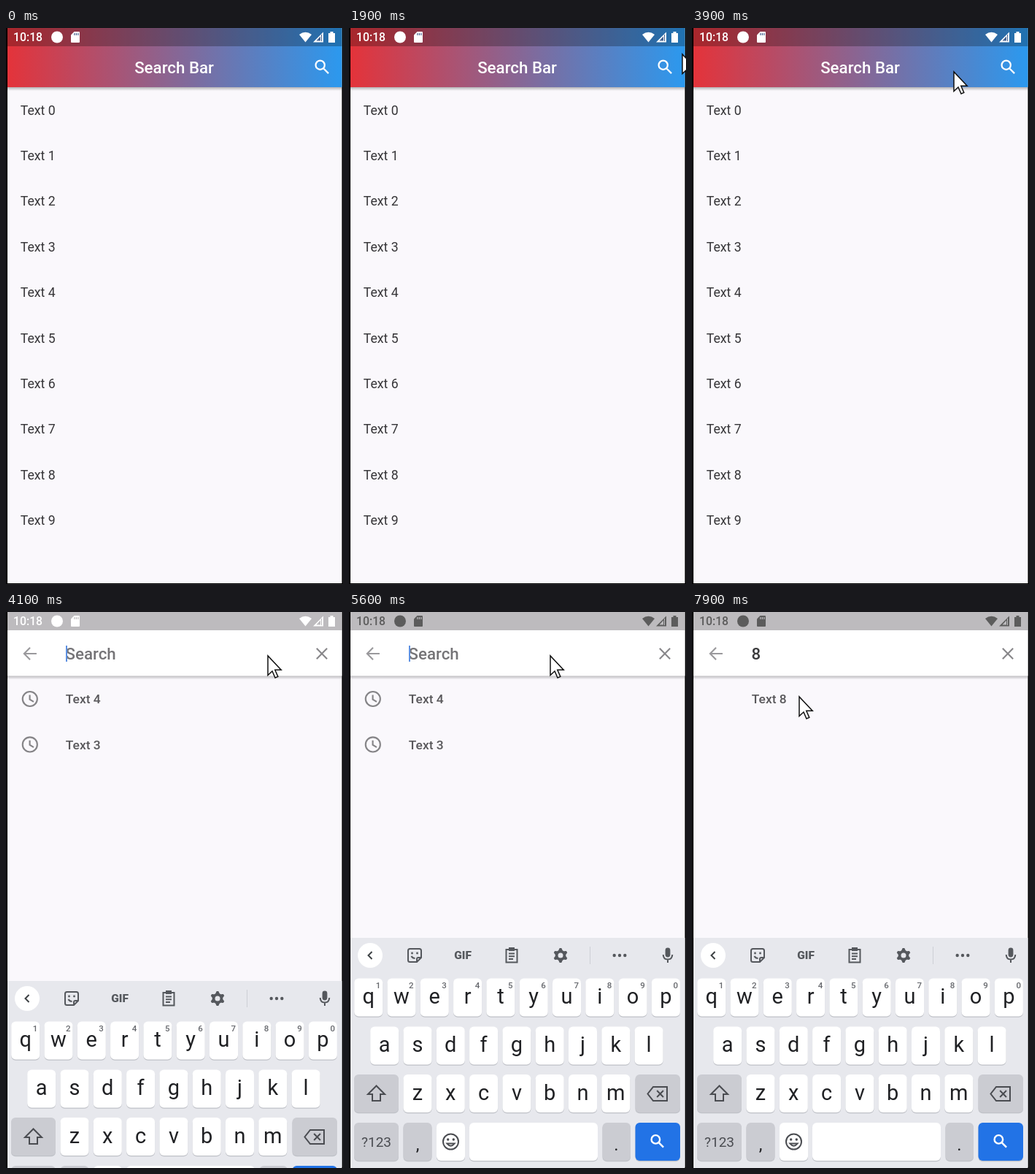
Animation, 462 px wide and 761 px high, one loop 8000 ms. Source, as an HTML page with a canvas:

```html
<!DOCTYPE html>
<html lang="en">
<head>
<meta charset="utf-8">
<title>Search Bar</title>
<style>
html, body { margin: 0; width: 100%; height: 100%; overflow: hidden; background: #000; }
canvas { display: block; width: 462px; height: 761px; }
</style>
</head>
<body>
<canvas id="stage"></canvas>
<script>
const W = 462, H = 761, LOOP = 8000, STEP = 100, DP = 1.117;
const LEFT = 2, RIGHT = 460.5, PAGE = '#faf8fc';
const canvas = document.getElementById('stage');
const ctx = canvas.getContext('2d');
const ratio = window.devicePixelRatio || 1;
canvas.width = W * ratio;
canvas.height = H * ratio;

// Icon outlines around (0, 0)
const ICON = {
  search: 'M3 -2.5A5.5 5.5 0 1 1 -8 -2.5A5.5 5.5 0 1 1 3 -2.5M1.5 1.5L7.7 7.7',
  back: 'M8 0H-7M0 -7.3L-7.3 0L0 7.3',
  close: 'M-6.4 -6.4L6.4 6.4M6.4 -6.4L-6.4 6.4',
  clock: 'M9 0A9 9 0 1 1 -9 0A9 9 0 1 1 9 0M-.2 -5V.5L4.6 3.4',
  chevron: 'M2.5 -5L-2.5 0L2.5 5',
  sticker: 'M-6.5 -9H6.5Q9 -9 9 -6.5V3L3 9H-6.5Q-9 9 -9 6.5V-6.5Q-9 -9 -6.5 -9ZM3 9V5Q3 3 5 3H9M-4.5 1Q-3 4 .5 4',
  clipboard: 'M-7.5 -8H7.5V9.5H-7.5ZM-4 -2.5H4M-4 1.2H4M-4 5H2',
  micStand: 'M-6.3 -1Q-6 5.5 0 5.5Q6 5.5 6.3 -1M0 5.5V10',
  shift: 'M0 -10.5L-11.5 1H-5.5V10H5.5V1H11.5Z',
  erase: 'M-6 -9.5H13V9.5H-6L-13.5 0ZM-.8 -4.5L8 4.5M8 -4.5L-.8 4.5',
  smile: 'M10.5 0A10.5 10.5 0 1 1 -10.5 0A10.5 10.5 0 1 1 10.5 0M-5.2 2.5Q0 9 5.2 2.5Z',
  arrow: 'M0 0V26.5L6 21L10 30L13.8 28.4L9.8 19.2H18.2Z'
};

// Pointer stops: time, x, y
const PATH = [
  [100, 470, 60], [900, 332, 223], [1200, 332, 223], [1300, 293, 104],
  [1400, 293, 104], [1900, 457, 36], [2100, 462, 30], [2600, 440, 30],
  [3000, 430, 44], [3500, 430, 46], [3900, 359, 60], [4100, 359, 60],
  [4700, 276, 60], [7000, 276, 60], [7500, 190, 166], [7900, 147, 116]
];

const clamp = v => Math.max(0, Math.min(1, v));

function rect(x, y, w, h, color) {
  ctx.fillStyle = color;
  ctx.fillRect(x, y, w, h);
}

function rounded(x, y, w, h, r, color) {
  ctx.fillStyle = color;
  ctx.beginPath();
  ctx.roundRect(x, y, w, h, r);
  ctx.fill();
}

function disc(x, y, r, color) {
  ctx.fillStyle = color;
  ctx.beginPath();
  ctx.arc(x, y, r, 0, Math.PI * 2);
  ctx.fill();
}

function text(str, x, y, size, color, weight = 400, align = 'left') {
  ctx.font = `${weight} ${size}px Roboto, sans-serif`;
  ctx.textAlign = align;
  ctx.fillStyle = color;
  ctx.fillText(str, x, y);
}

function shape(d, x, y, color) {
  ctx.save();
  ctx.translate(x, y);
  ctx.fillStyle = color;
  ctx.fill(new Path2D(d));
  ctx.restore();
}

function icon(name, x, y, color, line = 2, scale = 1) {
  ctx.save();
  ctx.translate(x, y);
  ctx.scale(scale, scale);
  ctx.strokeStyle = color;
  ctx.lineWidth = line;
  ctx.stroke(new Path2D(ICON[name]));
  ctx.restore();
}

function shadow(y, h, alpha) {
  const g = ctx.createLinearGradient(0, y, 0, y + h);
  g.addColorStop(0, `rgba(0,0,0,${alpha})`);
  g.addColorStop(1, 'rgba(0,0,0,0)');
  rect(LEFT, y, RIGHT - LEFT, h, g);
}

function statusBar(color, back) {
  text('10:18', 10, 18, 15.8, color, 500);
  disc(70, 12.5, 8, color);
  shape('M93.5 5H100Q101 5 101 6V19Q101 20 100 20H90Q89 20 89 19V9.5Z', 0, 0, color);
  for (let i = 0; i < 3; i++) rect(93.3 + i * 2.5, 7, 1.2, 3, back);
  shape('M410.5 19.5L402 9Q410.5 2.5 419 9Z', 0, 0, color);
  shape('M435 5.5V19.5H421Z', 0, 0, color);
  shape('M431 11.5V17.5H425.5Z', 0, 0, back);
  rect(432, 9, 1, 9, back);
  shape('M442 7H444.5V5H448.5V7H451V20H442Z', 0, 0, color);
}

function listPage() {
  rect(LEFT, 0, RIGHT - LEFT, H - 1, PAGE);
  const g = ctx.createLinearGradient(LEFT, 0, RIGHT, 0);
  g.addColorStop(0, '#e4333a');
  g.addColorStop(1, '#2b99ef');
  rect(LEFT, 0, RIGHT - LEFT, 81, g);
  rect(LEFT, 0, RIGHT - LEFT, 25, 'rgba(0,0,0,.26)');
  shadow(81, 5, .28);
  statusBar('#fff', '#44618f');
  text('Search Bar', 230.5, 62, 22.3, '#fff', 500, 'center');
  icon('search', 433.5, 53.5, '#fff', 2, DP);
  for (let i = 0; i < 10; i++) text('Text ' + i, 19.7, 118.6 + i * 62.4, 17.7, '#363538');
}

function gear(x, y, color) {
  ctx.fillStyle = color;
  ctx.beginPath();
  const teeth = 6;
  for (let i = 0; i < teeth * 4; i++) {
    const a = (i - .5) / (teeth * 4) * Math.PI * 2 + Math.PI / 6;
    const r = i % 4 < 2 ? 10 : 7.3;
    ctx.lineTo(x + r * Math.cos(a), y + r * Math.sin(a));
  }
  ctx.closePath();
  ctx.moveTo(x + 3.5, y);
  ctx.arc(x, y, 3.5, 0, Math.PI * 2);
  ctx.fill('evenodd');
}

function key(x, y, w, color = '#fff') {
  rounded(x, y + 1.3, w, 52, 6, '#bfc1c7');
  rounded(x, y, w, 52, 6, color);
}

function letters(str, first, y) {
  [...str].forEach((ch, i) => {
    const x = first + i * 45.3;
    key(x - 19.5, y, 39);
    text(ch, x, y + 34.5, 29, '#202124', 400, 'center');
  });
}

function toolbar() {
  const ink = '#55585d', y = 24;
  disc(29, y, 17, '#fff');
  icon('chevron', 29, y, '#3c4043');
  icon('sticker', 90, y, ink);
  disc(86.5, y - 3, 1.4, ink);
  disc(93.5, y - 3, 1.4, ink);
  text('GIF', 156, y + 5.3, 15.5, ink, 900, 'center');
  icon('clipboard', 223, y, ink);
  rect(219, y - 11, 8, 5, ink);
  gear(290, y, ink);
  rect(330, y - 12, 1, 24, '#cdcfd5');
  for (let i = -1; i < 2; i++) disc(371 + i * 7.3, y, 2.2, ink);
  rounded(433.6, y - 10.5, 6.8, 13, 3.4, ink);
  icon('micStand', 437, y, ink);
}

function keyboard(top) {
  const grey = '#cbccd2', ink = '#4a4c51';
  ctx.save();
  ctx.translate(0, top);
  rect(LEFT, 0, RIGHT - LEFT, 330, '#e7e8ed');
  toolbar();
  letters('qwertyuiop', 26.7, 55.5);
  for (let i = 0; i < 10; i++) {
    text((i + 1) % 10, 40 + i * 45.3, 69, 11.5, '#66686d', 500, 'center');
  }
  letters('asdfghjkl', 48.7, 121.5);
  letters('zxcvbnm', 94, 187);
  key(7, 187, 61, grey);
  icon('shift', 37.5, 213, ink);
  key(392.5, 187, 61.5, grey);
  icon('erase', 423, 213.5, ink);

  const y = 253;
  key(7, y, 61, grey);
  text('?123', 37.5, y + 32.5, 19, ink, 400, 'center');
  key(74.5, y, 39, grey);
  text(',', 94, y + 38, 24, '#202124', 400, 'center');
  key(120, y, 39);
  icon('smile', 139.5, y + 26, ink);
  disc(135.7, y + 23, 1.7, ink);
  disc(143.3, y + 23, 1.7, ink);
  key(165, y, 176);
  key(347.5, y, 38.5, grey);
  text('.', 366.5, y + 38, 24, '#202124', 400, 'center');
  key(392.5, y, 61.5, '#2273e6');
  icon('search', 423, y + 25.5, '#fff', 2.3, 1.05);
  ctx.restore();
}

function caretOn(t) {
  if (t < 6200) return t < 5100 || (t >= 5600 && t < 6100);
  return Math.floor((t - 6200) / 500) % 2 === 0;
}

function searchPage(t) {
  const typed = t >= 6200;
  rect(LEFT, 0, RIGHT - LEFT, H - 1, PAGE);
  rect(LEFT, 25, RIGHT - LEFT, 62.5, '#fff');
  shadow(87.5, 5, .24);
  rect(LEFT, 0, RIGHT - LEFT, 25, '#bdbbbe');
  const tone = Math.round(255 - 163 * clamp((t - 4100) / 200));
  statusBar(`rgb(${tone},${tone},${tone})`, '#bdbbbe');
  icon('back', 33, 57, '#9a999c', 1.9, DP);
  icon('close', 433, 57, '#88878a', 1.9, DP);

  text(typed ? '8' : 'Search', 81.5, 65, 22.3, typed ? '#3b3b3d' : '#757477', 500);
  if (caretOn(t)) rect(typed ? 94.5 : 82, 46, 2, 22, '#5d91e2');

  (typed ? ['8'] : ['4', '3']).forEach((n, i) => {
    const y = 119 + i * 62.4;
    if (!typed) icon('clock', 32.8, y, '#858487', 1.9, DP);
    text('Text ' + n, 81.8, y + 6.3, 17.4, '#59585b', 500);
  });

  if (t >= 4100) keyboard(446 + (t < 4500 ? 59 * Math.pow(.3, (t - 4100) / 100) : 0));
}

function pointer(t) {
  if (t < PATH[0][0]) return;
  let i = 0;
  while (i < PATH.length - 2 && t >= PATH[i + 1][0]) i++;
  const [t0, x0, y0] = PATH[i], [t1, x1, y1] = PATH[i + 1];
  const p = clamp((t - t0) / (t1 - t0));
  const k = p * p * (3 - 2 * p);
  const x = x0 + (x1 - x0) * k, y = y0 + (y1 - y0) * k;
  shape(ICON.arrow, x, y, '#fff');
  icon('arrow', x, y, '#111', 1.5);
}

function draw(t) {
  ctx.setTransform(ratio, 0, 0, ratio, 0, 0);
  rect(0, 0, W, H, '#000');
  if (t < 4100) listPage();
  if (t >= 4000) {
    ctx.globalAlpha = t < 4100 ? .5 : 1;
    searchPage(t);
    ctx.globalAlpha = 1;
  }
  pointer(t);
}

const start = performance.now();
function tick() {
  const t = (performance.now() - start) % LOOP;
  draw(Math.floor(t / STEP) * STEP);
  requestAnimationFrame(tick);
}
tick();
</script>
</body>
</html>
```
